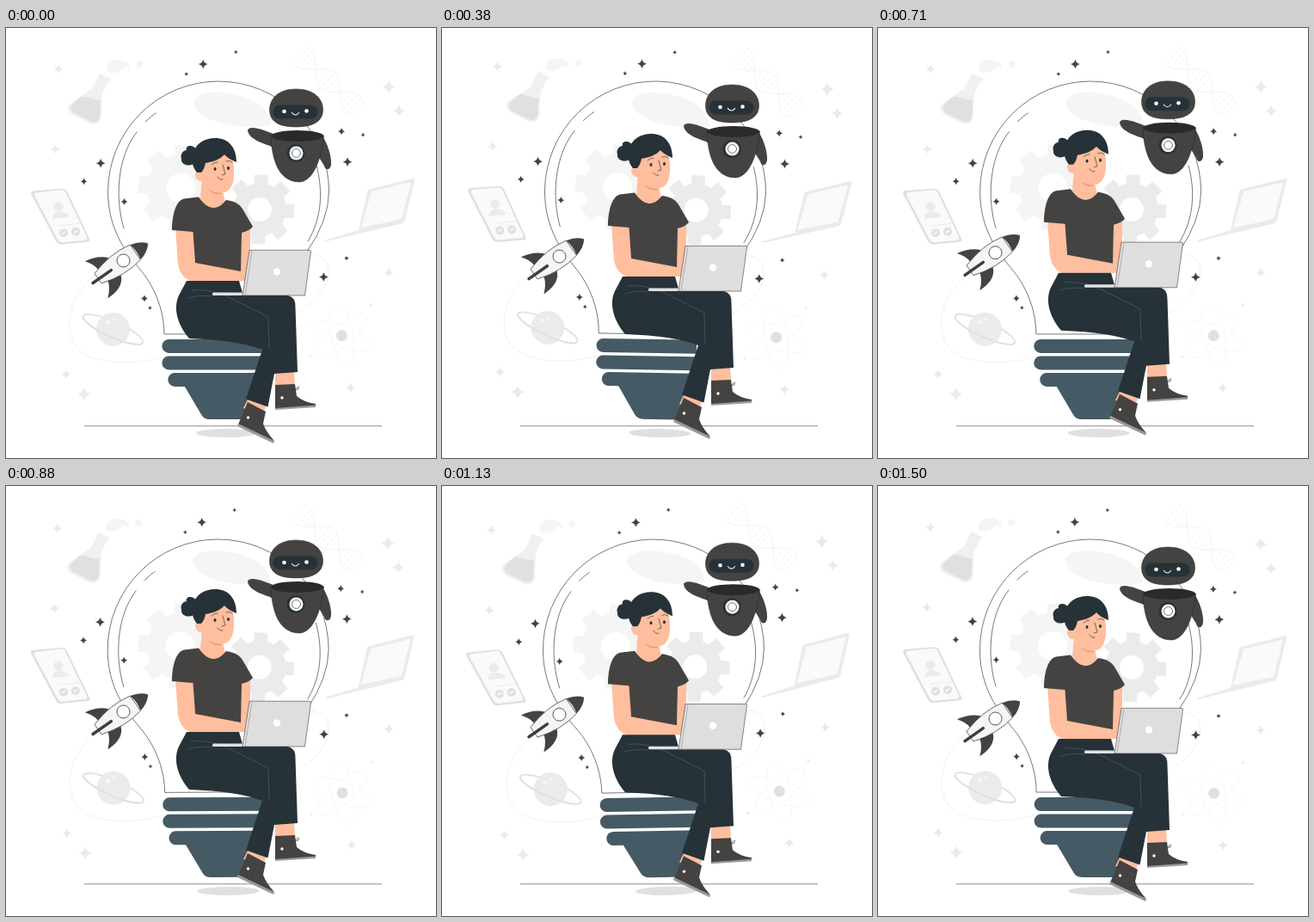
An HTML page for the animation above (1540 ms loop, 500 by 500 pixels).

```html
<!DOCTYPE html>
<html lang="en">
<head>
<meta charset="utf-8">
<title>Ideas in the air</title>
<style>
  html, body { margin: 0; width: 100%; height: 100%; overflow: hidden; background: #fff; }
  svg { display: block; width: 100vw; height: 100vh; }
  .dark { fill: #444341; }
  .ink { fill: #263238; }
  .skin { fill: #ffbe9d; }
  .steel { fill: #455a64; }
  .pale { fill: #f5f5f5; }
  .glass { fill: #fafafa; }
  .soft { fill: #ebebeb; }
  .mid { fill: #e0e0e0; }
  .white { fill: #fff; }
  .line { fill: none; stroke: #403e3d; stroke-width: .7; stroke-linecap: round; }
  .faint { fill: none; stroke: #ebebeb; stroke-width: .7; }
</style>
</head>
<body>
<svg viewBox="0 0 500 500">
  <path d="M91 462.800H437" stroke="#8c8c8c"/>

  <g id="sway">
    <path class="faint" d="M112 282C88 296 72 322 74 348C76 378 98 388 138 389Q164 389 190 380M310 345C350 330 374 306 375 284Q375 266 356 262"/>
    <g id="stars"></g>
    <g id="dna" class="faint" opacity=".75" transform="translate(374 61) rotate(43)"></g>

    <!-- flask -->
    <g transform="translate(115 56) rotate(26)">
      <path fill="#f0f0f0" d="M-7.500 0H7.500V4H6V20L17 45Q19 55 10 57H-14Q-25 55-22 46L-7 20V4H-7.500Z"/>
      <path class="mid" d="M-14 33L8 28L15 45Q17 53 9 54.500H-13Q-22 53-19.500 46Z"/>
    </g>
    <path class="pale" d="M117 49C116 41 125 36 132 37.500C140 38 144 42 144 47C138 44 135 46 132 50C127 54 118 53 117 49Z"/>
    <circle class="pale" cx="155" cy="42.500" r="4"/>

    <!-- phone -->
    <path class="mid" d="M33 189.500L65 187Q69 187 71 190L97 245Q99 249 95 249L64 252Q60 252 58 248L30 195Q27 190 33 189.500Z"/>
    <path class="glass" d="M36 191.500L65 188.500Q68 188.500 69 191L94 243Q95 246 92 247L66 249.500Q62 250 60 246L33 195Q32 192 36 191.500Z"/>
    <circle class="soft" cx="61" cy="208" r="5.500"/>
    <path class="soft" d="M54 222Q54 215 61 214Q70 213 74 220Z"/>
    <path d="M61 230L86 227.500" stroke="#ebebeb"/>
    <circle class="mid" cx="67" cy="238.500" r="5"/>
    <circle class="mid" cx="81" cy="237" r="5"/>
    <path d="M65 240L69 237M79 238.500L83 235.500" stroke="#fff" stroke-width="1.500"/>

    <!-- open laptop -->
    <path class="soft" d="M423 187L473 174.500Q475.500 174 475 177L464 223Q463 225 461 227L373 248L371 246.500L410 235L420 190Q421 187.500 423 187Z"/>
    <path class="glass" d="M425 190L471 179L460 222L413 232Z"/>

    <!-- planet -->
    <g transform="translate(124.500 350.500) rotate(24)">
      <ellipse rx="38" ry="9" fill="none" stroke="#e0e0e0" stroke-width="1.800"/>
      <circle class="soft" r="19.500"/>
      <path d="M-38 0A38 9 0 0 0 38 0" fill="none" stroke="#e0e0e0" stroke-width="1.800"/>
      <circle class="pale" cx="-9" cy="-5" r="2.500"/><circle class="pale" cx="-4" cy="-11" r="2"/>
    </g>

    <!-- atom -->
    <g id="atom" transform="translate(390.500 357.500)"><circle class="mid" r="6.500"/></g>

    <!-- bulb -->
    <path class="pale" d="M218 86C222 72 250 73 275 80C298 87 308 100 308 113C285 118 222 114 218 86Z"/>
    <g id="gears"></g>
    <path class="line" d="M265 356H184C184 336 178 312 163 290C152 274 118.500 245 118.500 190.500A128.500 128.500 0 0 1 375.500 190.500Q375 224 350 260"/>
    <path class="line" d="M162 109Q168 103 174 99M152 121C128 152 127 200 137 233M361 160C369 190 367 222 351 248"/>

    <g class="steel">
      <path d="M298 362H189.500a8 8 0 0 0 0 16H298Z"/>
      <path d="M297 381.500H189.500a8 8 0 0 0 0 16H296Z"/>
      <path d="M294 401H196.500a8 8 0 0 0 0 16H208L227 449Q230 455 237 455H276Z"/>
    </g>
    <ellipse class="mid" cx="257" cy="471" rx="36" ry="5"/>
  </g>

  <g id="lift">
    <!-- rocket -->
    <g transform="translate(136.500 270.500) rotate(-35)">
      <path class="dark" d="M-12-12Q-20-22-37-25Q-30-16-30-8ZM-12 12Q-17 26-40 25.500Q-30 17-28 8Z"/>
      <path class="pale" stroke="#403e3d" stroke-width=".7" d="M17-10.500Q-8-16-36-7V7Q-8 16 17 10.500Z"/>
      <path class="dark" d="M35 0Q29-8 17-10.500Q20 0 17 10.500Q29 8 35 0Z"/>
      <circle class="white" r="7.500" stroke="#403e3d" stroke-width=".8"/>
      <path d="M-44 1H-18" stroke="#403e3d" stroke-width="3.500" stroke-linecap="round"/>
    </g>

    <!-- robot -->
    <g class="dark">
      <path d="M281 119C282 114 292 116 300 119L311 123L312 139C302 135 282 130 281 119Z"/>
      <path d="M367 124C374 134 379 150 378 159C377 166 371 166 370 160L363 149Z"/>
      <path stroke="#222" stroke-width=".5" d="M308 125C309 155 318 179 341 179C357 179 367 152 369.500 125Z"/>
      <path stroke="#222" stroke-width=".5" d="M337 71C358 71 368.500 82 368.500 95C368.500 110 355 115 337 115C319 115 306.500 110 306.500 95C306.500 82 317 71 337 71Z"/>
    </g>
    <ellipse cx="338.800" cy="125.500" rx="30.500" ry="6.500" fill="#2b2a2a"/>
    <rect class="ink" x="310.500" y="89.500" width="52" height="16" rx="8"/>
    <circle class="white" cx="323.500" cy="97" r="2.300"/>
    <circle class="white" cx="349.500" cy="96.500" r="2.300"/>
    <path d="M332 98Q336.500 104 341 98" fill="none" stroke="#fff" stroke-width="1.100"/>
    <circle class="ink" cx="337" cy="145.500" r="10.500"/>
    <circle class="white" cx="337.500" cy="145.500" r="8"/>
    <circle class="line" cx="337.500" cy="145.500" r="5"/>

    <!-- head -->
    <path class="ink" d="M218 158C211 162 203 158 204 152C202 146 207 142 210 142C208 136 218 135 221 141Z"/>
    <path class="skin" d="M228 172L226 198Q240 226 255 202L251 186Z"/>
    <path d="M235 187Q242 192 251 191V193Q241 195 235 187Z" fill="#f59b7b"/>
    <path class="skin" d="M228 150L254 141Q264 147 265 162Q266 179 261 186Q256 193 246 191.500Q233 189 229 178Q221 179 220 171Q220 165 227 166Z"/>
    <path class="ink" d="M222 168C216 161 215 150 217 146C221 134 231 128 243 128C258 128 268 138 268 156C263 154 257 151 254 147C249 153 239 156 232 157C231 161 230 165 227 168Z"/>
    <ellipse class="ink" cx="243" cy="164" rx="1.500" ry="2"/>
    <ellipse class="ink" cx="258.500" cy="163" rx="1.500" ry="2"/>
    <path class="line" d="M239 159Q242 156 246 156M256 155Q260 153 263 156M252 159L255 170L251 171M246 173Q248 177 252 176"/>

    <!-- body -->
    <path class="skin" d="M197 233L219 236L220 272L272 281V238L284 233Q285 265 280 294H214Q203 290 200 275Z"/>
    <path class="dark" d="M224 196.500Q240 220 256 200C268 202 272 205 276 212L287 231Q283 236 274 238L273 283L220 273L217.500 237L193 235C193 222 196 201 207 198.500Z"/>
    <path class="skin" d="M313 399H335L336 416H313ZM282 430L303 438L298 451L276 442Z"/>
    <path class="dark" d="M313 415L336 414L338 428Q346 435 360 437V440L313 443ZM281 435L302 446L299 460Q302 469 311 479L312 481L270 461Z"/>
    <path d="M313 442L360 438.500V441L313 444ZM270 460L312 480L311 483L269 463Z" fill="#999"/>
    <path class="line" d="M336 421Q342 413 340 420L335 421"/>
    <circle class="white" cx="321" cy="430" r="1.700"/>
    <circle class="white" cx="281.500" cy="453" r="1.700"/>
    <path class="ink" d="M210 294H271L275 308L328 311Q337 313 336.500 325L339 400L312 402L304.500 440.500L279 431.500L298 374Q270 363 213 361C200 346 193 325 202 309Z"/>
    <path fill="none" stroke="#455a64" stroke-width=".8" d="M216 305Q235 303 257 312L305 336L306 373M212 314Q224 310 240 312"/>

    <!-- laptop on knees -->
    <rect class="mid" x="240" y="307.500" width="108" height="3.500" rx="1.500"/>
    <path d="M283 258.300L275 311H347.500L354.500 260Q354.500 258.300 353 258.300Z" fill="#dedede" stroke="#403e3d" stroke-width=".6"/>
    <path d="M286 259L278 311" stroke="#999" stroke-width=".7"/>
    <circle class="white" cx="315" cy="283.500" r="4.200"/>
  </g>
</svg>
<script>
const LOOP = 1540, LEAD = 20;
const byId = id => document.getElementById(id);
const add = (id, markup) => byId(id).insertAdjacentHTML('beforeend', markup);
const polar = (r, a) => `${(r * Math.cos(a)).toFixed(2)} ${(r * Math.sin(a)).toFixed(2)}`;

function star(cls, x, y, r) {
  const k = r * 0.18;
  add('stars', `<path class="${cls}" transform="translate(${x} ${y})"
    d="M0 ${-r}Q${k} ${-k} ${r} 0Q${k} ${k} 0 ${r}Q${-k} ${k} ${-r} 0Q${-k} ${-k} 0 ${-r}Z"/>`);
}

function gear(cls, x, y, outer, inner, hole, turn) {
  const points = [];
  for (let i = 0; i < 8; i++) {
    const a = i * Math.PI / 4 + turn;
    points.push(polar(inner, a - 0.26), polar(outer, a - 0.19), polar(outer, a + 0.19), polar(inner, a + 0.26));
  }
  add('gears', `<g transform="translate(${x} ${y})">
    <path class="${cls}" d="M${points.join('L')}Z"/>
    <circle class="white" r="${hole}"/></g>`);
}

function helix() {
  const wave = x => 13 * Math.cos(Math.PI * x / 39);
  let a = '', b = '', rungs = '';
  for (let x = -44; x <= 48; x += 2) {
    const y = wave(x), cmd = a ? 'L' : 'M';
    a += `${cmd}${x} ${y}`;
    b += `${cmd}${x} ${-y}`;
    if (x % 6 === 0) rungs += `M${x} ${y}V${-y}`;
  }
  add('dna', `<path d="${a + b + rungs}"/>`);
}

[[61, 48, 6], [445, 68, 8], [457, 96, 7], [57, 141, 6], [445, 284, 6],
 [91, 426, 8], [70, 403, 6], [401, 418, 6], [424.5, 322, 2.5], [354, 382, 2.5]]
  .forEach(s => star('soft', ...s));
[[229, 42, 5.5], [209.5, 53.5, 2.5], [267, 28, 2.5], [110, 157.5, 5.5], [90.5, 178.5, 4.2],
 [137.5, 202, 4.2], [390, 120, 4.2], [415, 124, 2.5], [397, 155.5, 5.5],
 [369.5, 289.5, 5.5], [396, 267.5, 2.7], [161, 314.5, 4.2], [167.5, 325.5, 2.5]]
  .forEach(s => star('dark', ...s));
[20, 80, 140].forEach(a =>
  add('atom', `<ellipse class="faint" opacity=".5" rx="37" ry="13" transform="rotate(${a})"/>`));
gear('pale', 203, 186, 50, 39, 17, 0.08);
gear('soft', 295, 211, 41, 31, 14, 0.05);
helix();

function draw(now) {
  const p = (now + LEAD) % LOOP / LOOP;
  const rise = 1 - Math.abs(1 - 2 * p);
  const angle = p < 0.25 ? 4 * p : p < 0.75 ? 2 - 4 * p : 4 * p - 4;
  byId('lift').setAttribute('transform', `translate(0 ${0.26 - 10 * rise})`);
  byId('sway').setAttribute('transform', `rotate(${angle} 250 250)`);
}

const start = performance.now();
function tick() {
  draw(performance.now() - start);
  requestAnimationFrame(tick);
}
tick();
</script>
</body>
</html>
```
